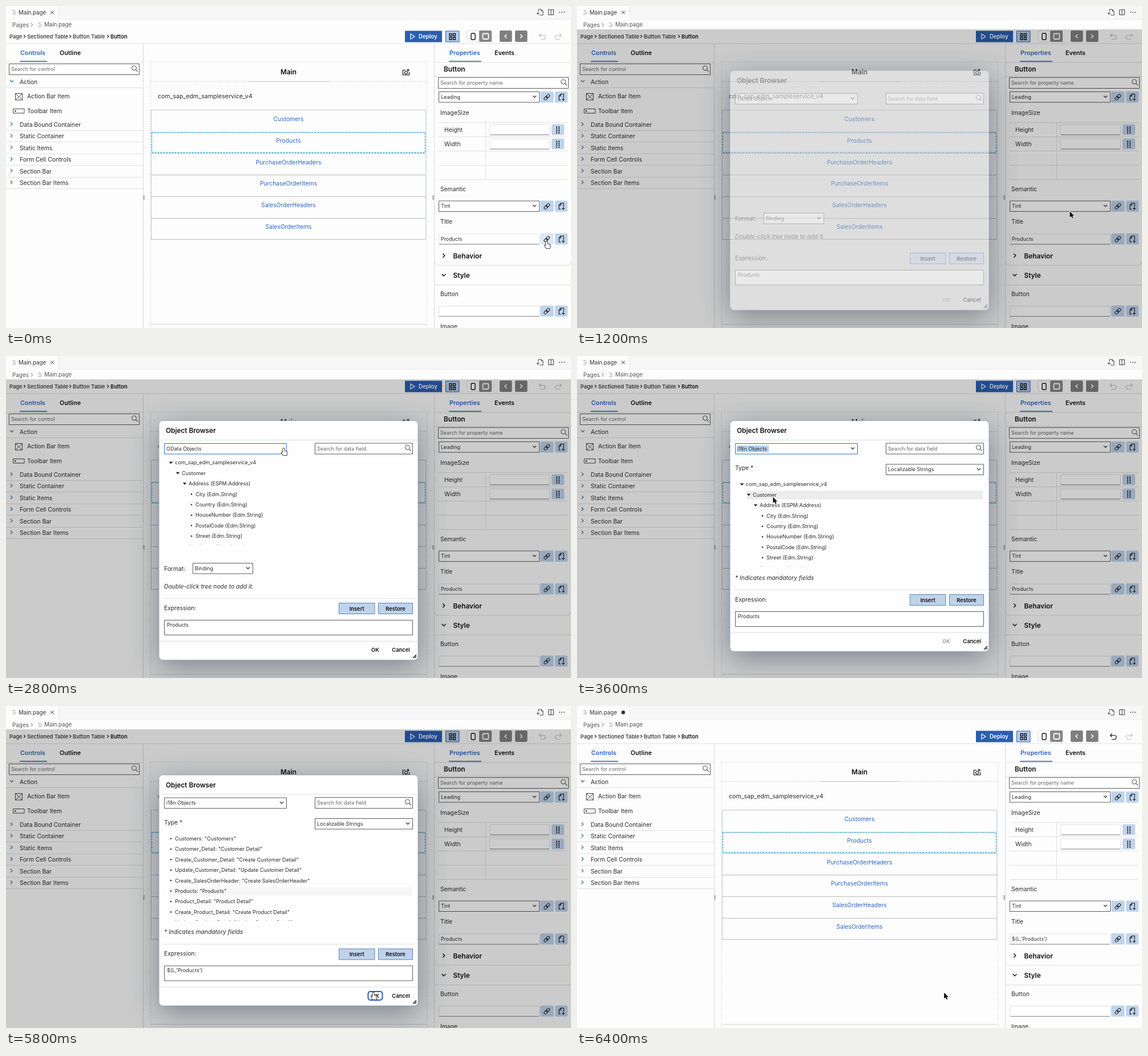
These frames come from a looping animation (990 by 565 pixels, 7000 ms). An HTML page with a canvas:

```html
<!DOCTYPE html>
<html lang="en">
<head>
<meta charset="utf-8">
<title>Object Browser</title>
<style>
html, body { margin: 0; width: 100%; height: 100%; overflow: hidden; background: #fdfdfd; }
canvas { display: block; }
</style>
</head>
<body>
<canvas id="stage" width="990" height="565"></canvas>
<script>
const ctx = document.getElementById('stage').getContext('2d');
const LOOP = 7000, STEP = 200;
const PAGE = '#fdfdfd', INK = '#2b2b2b', BLACK = '#111', BLUE = '#2a67c4', PALE = '#bfd3ec', RULE = '#e0e0e0', EDGE = '#5c5c5c';
const BOLD = '600', ITALIC = 'italic 400';

// y is the middle of the capitals
function text(str, x, y, size = 10.3, color = INK, style = '400', align = 'left') {
  ctx.font = `${style} ${size}px Inter, sans-serif`;
  ctx.textAlign = align;
  ctx.fillStyle = color;
  ctx.fillText(str, x, y + size * 0.36);
}

function box(x, y, w, h, fill, stroke, r = 0, width = 1) {
  ctx.beginPath();
  ctx.roundRect(x, y, w, h, r);
  if (fill) { ctx.fillStyle = fill; ctx.fill(); }
  if (stroke) { ctx.strokeStyle = stroke; ctx.lineWidth = width; ctx.stroke(); }
}

function path(d, x, y, stroke, width = 1, fill) {
  const shape = new Path2D(d);
  ctx.save();
  ctx.translate(x, y);
  if (stroke) { ctx.strokeStyle = stroke; ctx.lineWidth = width; ctx.stroke(shape); }
  if (fill) { ctx.fillStyle = fill; ctx.fill(shape); }
  ctx.restore();
}

const hline = (x1, x2, y, color = RULE, width = 1) => path(`M${x1} 0H${x2}`, 0, y, color, width);
const vline = (x, y1, y2, color = RULE, width = 1) => path(`M0 ${y1}V${y2}`, x, 0, color, width);
const dot = (x, y, r, color) => box(x - r, y - r, 2 * r, 2 * r, color, null, r);
const chevronRight = (x, y, s = 3, color = INK, w = 1.2) => path(`M${-s / 2} ${-s}L${s / 2} 0L${-s / 2} ${s}`, x, y, color, w);
const chevronDown = (x, y, s = 3, color = INK, w = 1.2) => path(`M${-s} ${-s / 2}L0 ${s / 2}L${s} ${-s / 2}`, x, y, color, w);
const magnifier = (x, y) => path('M3.4 -.6a3.9 3.9 0 1 1 -7.8 0a3.9 3.9 0 1 1 7.8 0M2.3 2.2L6 5.8', x, y, '#666', 1.2);
const fileLines = (x, y) => path('M0 -3H5M2 0H7M0 3H6', x, y, '#999');

function searchBox(x, y, w, hint) {
  box(x + .5, y + .5, w, 19, '#fff', EDGE);
  text(hint, x + 4, y + 10, 9, '#666');
  magnifier(x + w - 8, y + 8.5);
}

function select(x, y, w, value, { edge = EDGE, marked = false, arrow = true } = {}) {
  box(x + .5, y + .5, w, 18.5, '#fff', edge);
  if (marked) box(x + 3, y + 4, 56, 12, '#b5d3f3');
  text(value, x + 4, y + 9.7, 9);
  if (arrow) chevronDown(x + w - 8, y + 9, 3, '#444', 1.4);
}

function input(x, y, w, value = '') {
  box(x + .5, y + .5, w, 18, '#fff', RULE, 2);
  hline(x + 1, x + w, y + 18.5, '#888');
  text(value, x + 4, y + 9.3, 8.9);
}

function linkButtons(y, hover) {
  box(936, y, 23.5, 19.5, hover ? '#dde8f6' : PALE, null, 2);
  box(962, y, 22, 19.5, PALE, null, 2);
  ctx.save();
  ctx.translate(947.7, y + 10);
  ctx.rotate(-Math.PI / 4);
  box(-6, -2.2, 6.8, 4.4, null, BLACK, 2.2, 1);
  box(-.8, -2.2, 6.8, 4.4, null, BLACK, 2.2, 1);
  ctx.restore();
  path('M-1 5H-4V-2L-1 -5.5H4V1M-1 -5.5V-2H-4M1 4H6M3.5 1.5V6.5', 973, y + 10, BLACK, 1.1);
}

function dotsButton(y) {
  box(956, y, 22, 19, PALE, null, 2);
  for (let i = 0; i < 8; i++) box(964 + i % 2 * 4, y + 4 + (i >> 1) * 3.3, 2, 2, BLACK);
}

function drawTopBar(dirty) {
  box(0, 0, 990, 565, PAGE);
  box(92, 0, 898, 23.5, '#f7f7f7');
  hline(92, 990, 23.5, '#eee');
  vline(92.5, 0, 23, '#e4e4e4');
  fileLines(11, 11);
  text('Main.page', 22, 11.5, 9.7, '#333');
  if (dirty) dot(81, 11.3, 3.2, '#333');
  else path('M-3 -3L3 3M3 -3L-3 3', 81, 11.3, '#333');
  path('M-3 -1V-5H2L5 -2V5H-1M2 -5V-2H5M-6 2H-1M-3 0L-5.5 2L-3 4', 936, 11, '#444');
  path('M-4.5 -4.5H4.5V4.5H-4.5ZM0 -4.5V4.5', 955, 11, '#444');
  for (const x of [970, 974, 978]) dot(x, 11, .9, '#444');
  text('Pages', 11, 33, 9.9, '#555');
  chevronRight(45, 33, 3.2, '#666', 1);
  fileLines(56, 33);
  text('Main.page', 67, 33, 9.7, '#555');

  for (const [name, x] of [['Page', 6], ['Sectioned Table', 37], ['Button Table', 117], ['Button', 183]]) {
    text(name, x, 53.3, 9.3, name === 'Button' ? BLACK : '#444', BOLD);
    if (x > 6) chevronRight(x - 4.5, 53.3, 2.6, '#333', 1.3);
  }
  box(699, 43.5, 65, 20, '#2a5eb0');
  path('M0 -4.5L7 0L0 4.5Z', 709, 53.5, '#fff', 1.2);
  text('Deploy', 723, 53.5, 9.7, '#fff', BOLD);
  box(770.5, 44, 23.5, 19, '#b3cdec', '#2a5eb0');
  for (const [x, y] of [[777, 48.5], [783.5, 48.5], [777, 55], [783.5, 55]]) box(x, y, 4, 4, null, BLACK, 0, 1.3);
  box(807.5, 43.5, 22, 19, '#fff', '#ddd', 2);
  box(815, 48, 7, 11, null, BLACK, 1.5, 1.4);
  box(829, 43, 22, 20, '#878787', null, 2);
  box(835.5, 48.5, 10, 9.5, null, '#fff', 1.5, 1.8);
  for (const [x, s] of [[865, -1], [892, 1]]) {
    box(x, 43, 21.5, 20, '#7f7f7f', null, 2);
    path(`M${-1.7 * s} -3.3L${1.7 * s} 0L${-1.7 * s} 3.3`, x + 10.7, 53, '#fff', 1.6);
  }
  path('M-2 -5.5L-5 -2.5L-2 .5M-5 -2.5H2A3.5 3.5 0 0 1 2 4.5H-3', 939.5, 54, dirty ? BLACK : '#bbb', 1.2);
  path('M2 -5.5L5 -2.5L2 .5M5 -2.5H-2A3.5 3.5 0 0 0 -2 4.5H3', 968, 54, '#c4c4c4', 1.2);
  hline(0, 990, 66);
}

function tab(name, x, width) {
  text(name, x, 82.5, 10.7, width ? BLUE : BLACK, BOLD);
  if (width) box(x - 1, 96, width, 2.5, '#6c8cbb', null, 1);
}

function drawControls() {
  tab('Controls', 25, 48);
  tab('Outline', 94);
  hline(0, 240, 99);
  searchBox(5, 101, 228, 'Search for control');
  chevronDown(10, 132, 3, '#3a6a96');
  text('Action', 24, 133.3);
  hline(0, 240, 143.5);
  box(16.5, 153.5, 12, 11.5, null, '#444');
  path('M0 0L12 11.5M12 0L0 11.5', 16.5, 153.5, '#444');
  text('Action Bar Item', 37, 158.3);
  box(12.5, 180.5, 19.5, 7.5, null, '#444');
  box(15, 183, 2.5, 2.5, '#444');
  text('Toolbar Item', 37, 184);
  ['Data Bound Container', 'Static Container', 'Static Items', 'Form Cell Controls', 'Section Bar', 'Section Bar Items']
    .forEach((name, i) => {
      const y = 208.3 + i * 20.4;
      chevronRight(9.5, y - 1, 3, '#3a6a96');
      text(name, 24, y);
      hline(0, 240, Math.round(y + 9.7) + .5);
    });
  vline(240.5, 66, 565, '#d8d8d8');
  box(240, 332, 3, 8, '#bbb');
}

function drawCanvasArea() {
  hline(253, 738, 98.5, '#eee');
  text('Main', 495, 115.5, 11.8, BLACK, BOLD, 'center');
  path('M-1 -3.5H-5.5V5H5.5V0M2.5 1a2.5 2.5 0 1 1 -5 0a2.5 2.5 0 1 1 5 0M1 -3.5H6M3.5 -6V-1', 701, 116, BLACK, 1.2);
  ctx.setLineDash([2, 2]);
  hline(253, 738, 132.5, '#ccc');
  for (const x of [253.5, 737.5]) vline(x, 98, 565, '#c3d9e2');
  ctx.setLineDash([]);
  hline(425, 566, 132.5, '#bbb');
  text('com_sap_edm_sampleservice_v4', 266, 158.5, 10.6);
  hline(254, 736, 182.5, '#c4c4c4');
  ['Customers', 'Products', 'PurchaseOrderHeaders', 'PurchaseOrderItems', 'SalesOrderHeaders', 'SalesOrderItems']
    .forEach((name, i) => {
      const y = 198.5 + i * 37.75;
      hline(254, 736, Math.round(y + 22) + .5, '#bbb');
      text(name, 495, y, 10.3, BLUE, '400', 'center');
    });
  for (const x of [254.5, 735.5]) vline(x, 182, 409, '#ccc');
  ctx.setLineDash([3, 2]);
  box(255.5, 222, 479, 35, null, '#6fc4e4', 0, 1.8);
  ctx.setLineDash([]);
  hline(254, 737, 558.5, '#d4d4d4');
}

function drawProperties(title, linkHover) {
  vline(750.5, 66, 565, '#d8d8d8');
  box(747, 332, 3, 8, '#bbb');
  tab('Properties', 777, 57);
  tab('Events', 856);
  hline(751, 990, 99);
  text('Button', 767, 111, 11.8, BLACK, BOLD);
  hline(751, 990, 123.5);
  searchBox(757, 125, 228, 'Search for property name');
  select(758, 150, 176, 'Leading');
  linkButtons(150);
  text('ImageSize', 761, 187);
  for (const y of [204.5, 229.5, 254.5, 279.5, 304.5]) hline(758, 984, y);
  vline(840.5, 205, 304);
  [['Height', 217], ['Width', 242]].forEach(([name, y]) => {
    text(name, 768, y);
    input(847, y - 9.5, 105);
    dotsButton(y - 9.5);
  });
  text('Semantic', 761, 321.3);
  select(758, 341.5, 176, 'Tint');
  linkButtons(341.5);
  text('Title', 761, 378.5);
  input(758, 399.5, 176, title);
  linkButtons(399, linkHover);
  chevronRight(767, 438, 3.4, BLACK, 1.4);
  text('Behavior', 783.5, 438.3, 11.8, BLACK, BOLD);
  path('M751 449Q752 455 758 455H982Q988 455 990 449', 0, 0, RULE);
  chevronDown(767, 472, 3.4, BLACK, 1.4);
  text('Style', 783.5, 472.3, 11.8, BLACK, BOLD);
  hline(751, 990, 489.5);
  text('Button', 761, 505);
  input(758, 526, 176);
  linkButtons(525.5);
  text('Image', 761, 562);
}

const TREE = ['com_sap_edm_sampleservice_v4', 'Customer', 'Address (ESPM.Address)',
  ...['City', 'Country', 'HouseNumber', 'PostalCode', 'Street', 'FirstName'].map(n => n + ' (Edm.String)')];
const STRINGS = ['Customers', 'Customer_Detail', 'Create_Customer_Detail', 'Update_Customer_Detail', 'Create_SalesOrderHeader',
  'Products', 'Product_Detail', 'Create_Product_Detail', 'Update_Product_Detail']
  .map(key => `${key}: "${key.replaceAll('_', ' ')}"`);

function drawRows(rows, isTree, top, hover, hoverColor) {
  ctx.save();
  ctx.beginPath();
  ctx.rect(270, top - 9, 450, 153);
  ctx.clip();
  rows.forEach((row, i) => {
    const x = 296 + (isTree ? 12 * (i === 8 ? 2 : Math.min(i, 3)) : 0), y = top + i * 18.4;
    if (i === hover) box(x - 11, y - 7, 722 - x, 15, hoverColor);
    if (isTree && i < 3) path('M-3.3 -1.8H3.3L0 2Z', x - 7, y, null, 0, '#222');
    else dot(x - 7, y, 1.3, '#333');
    text(row, x, y, 9.1);
  });
  ctx.restore();
}

function button(label, x, y, w) {
  box(x + .5, y + .5, w, 19, PALE, '#5f83b5');
  text(label, x + w / 2 + .5, y + 10.2, 9.4, BLACK, BOLD, 'center');
}

// The shadow is kept outside the panel so that it does not show through while fading in
function drawPanel(x, y, w, h) {
  ctx.save();
  const outside = new Path2D();
  outside.rect(0, 0, 990, 600);
  outside.roundRect(x, y, w, h, 7);
  ctx.clip(outside, 'evenodd');
  ctx.globalAlpha = 1;
  ctx.shadowColor = 'rgba(30,45,65,.45)';
  ctx.shadowBlur = 50;
  ctx.shadowOffsetY = 12;
  box(x, y, w, h, '#fff', null, 7);
  ctx.restore();
  box(x, y, w, h, '#fefefe', 'rgba(110,140,175,.6)', 7);
}

function drawDialog(t) {
  const i18n = t >= 3600, listed = t >= 3800, inserted = t >= 4600, okFocus = t >= 5800;
  const opening = t < 1400;
  const height = i18n ? 405 : 420;
  ctx.save();
  ctx.globalAlpha = opening ? .36 : 1;
  ctx.translate(0, listed ? 7.5 : 0);
  drawPanel(268, 113.5, 454, height);

  text('Object Browser', 280, 131, 11.8, BLACK, BOLD);
  hline(268, 722, 147.5);
  const focused = t >= 2200 && t < 3800;
  select(277, 153, 214, i18n ? 'i18n Objects' : 'OData Objects', {
    edge: focused ? '#2a6fd0' : t >= 1800 && !i18n ? '#999' : EDGE,
    marked: i18n && !listed,
    arrow: opening || t < 1800 || i18n
  });
  searchBox(541, 152.5, 171, 'Search for data field');

  if (i18n) {
    text('Type *', 277, 196.3);
    select(541, 189.5, 171, 'Localizable Strings');
    if (listed) drawRows(STRINGS, false, 225.2, 5, okFocus ? '#f5f5f5' : '#ececec');
    else drawRows(TREE, true, 225.2, 1, '#ececec');
    text('* Indicates mandatory fields', 277, 389, 10.3, INK, ITALIC);
  } else {
    if (!opening) drawRows(TREE, true, 187.2);
    text('Format:', 277, 373);
    select(327, 363, 105, 'Binding');
    text('Double-click tree node to add it.', 277, 403.8, 10.3, INK, ITALIC);
  }

  ctx.translate(0, height - 420);
  hline(274, 716, 425.5);
  text('Expression:', 277, 442);
  button('Insert', 583, 433, 62.5);
  button('Restore', 652, 433, 60);
  box(277.5, 463.5, 435, 26, '#fff', inserted && !okFocus ? '#2a6fd0' : EDGE);
  text(inserted ? "$(L,'Products')" : 'Products', 282, 471.5, 9);
  hline(268, 722, 500.5);
  if (okFocus) box(634.5, 508.5, 25, 15, '#fff', '#2a5eb0', 4, 2);
  const okDisabled = opening || (i18n && !inserted);
  text('OK', 647, 516, 9.4, okDisabled ? '#999' : BLACK, BOLD, 'center');
  text('Cancel', 692, 516, 9.4, BLACK, BOLD, 'center');
  path('M-3 3L3 -3M0 3L3 0', 716, 527, BLACK, 1.2);
  ctx.restore();
}

const ARROW = 'M0 0V10.5L2.5 8.3L4.3 12L6 11.2L4.3 7.7H7.6Z';
const HAND = 'M-1.3 1a1.3 1.3 0 0 1 2.6 0V4.6L5 5.5Q6.3 6 6.1 7.5L5.3 12.3H-.4L-3.8 8Q-4.2 6.5 -2.8 6.5L-1.3 7.6Z';

// time, x, y of the pointer tip
const ROUTE = [[0, 947.5, 413], [1000, 947.5, 413], [1200, 863.5, 360.5], [1800, 486.5, 162], [2800, 486.5, 162],
  [3200, 340, 205], [3600, 343.5, 247.5], [4200, 381.5, 334.5], [5000, 381.5, 334.5], [5800, 643.5, 503], [7000, 643, 503]];

function drawPointer(t) {
  const next = ROUTE.findIndex(p => p[0] > t);
  const [a, b] = [ROUTE[next - 1], ROUTE[next]];
  const k = (t - a[0]) / (b[0] - a[0]);
  const x = a[1] + (b[1] - a[1]) * k, y = a[2] + (b[2] - a[2]) * k;
  const hand = t < 1200 || (t >= 1800 && t < 3000) || (t >= 5800 && t < 6200);
  if (hand) path(HAND, x, y, '#111', 1.6, '#fff');
  else path(ARROW, x, y, '#fff', 1.4, '#000');
}

function draw(now) {
  const t = Math.floor(now % LOOP / STEP) * STEP;
  const saved = t >= 6400;
  drawTopBar(saved);
  drawControls();
  drawCanvasArea();
  drawProperties(saved ? "$(L,'Products')" : 'Products', t < 1200);
  if (t >= 1200 && t < 6200) {
    box(0, 41, 990, 524, 'rgba(0,0,0,.2)');
    drawDialog(t);
  }
  drawPointer(t);
  requestAnimationFrame(draw);
}
requestAnimationFrame(draw);
</script>
</body>
</html>
```
